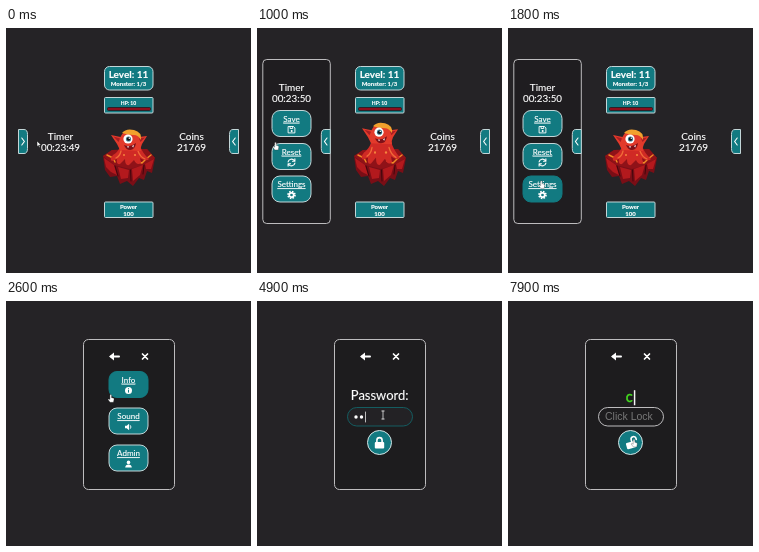
An HTML page for the animation above (8 s loop, 245 px wide and 245 px high).

```html
<!DOCTYPE html>
<html lang="en">
<head>
<meta charset="utf-8">
<title>Monster clicker</title>
<style>
html, body { margin: 0; height: 100%; overflow: hidden; background: #252326; }
svg { display: block; width: 100vw; height: 100vh; }
text { font-family: Lato, sans-serif; fill: #fff; stroke: #fff; stroke-width: .15px; text-anchor: middle; }
.hint { font-family: "Liberation Sans", Arial, sans-serif; fill: #777; stroke: none; text-anchor: start; }
</style>
</head>
<body>
<svg id="stage" viewBox="0 0 245 245"></svg>
<script>
const stage = document.getElementById('stage');
const LOOP = 8000, TEAL = '#127a81', EDGE = '#c3d6d8', FRAME = '#bdbcbe';

const text = (s, x, y, size, extra = '') =>
  `<text x="${x}" y="${y}" font-size="${size}" ${extra}>${s}</text>`;
const bold = (s, x, y, size) => text(s, x, y, size, 'font-weight="700"');
const box = (x, y, w, h, r, fill = TEAL, edge = EDGE) =>
  `<rect x="${x}" y="${y}" width="${w}" height="${h}" rx="${r}" fill="${fill}" stroke="${edge}"/>`;
const line = (d, w = 1, color = '#fff') =>
  `<path d="${d}" fill="none" stroke="${color}" stroke-width="${w}" stroke-linecap="round" stroke-linejoin="round"/>`;
const shape = (d, fill) => `<path d="${d}" fill="${fill}"/>`;
const disc = (x, y, r, fill) => `<circle cx="${x}" cy="${y}" r="${r}" fill="${fill}"/>`;
const at = (x, y, s, more = '') => `<g transform="translate(${x} ${y}) ${more}">${s}</g>`;

const ICONS = {
  save: line('M-3 -3H2L3.4 -1.6V3.4H-3Z M-1.4 -3V-1H1.2V-3', .9) + disc(.2, 1.4, 1, '#fff'),
  reset: line('M-3.4 -.6A3.5 3.5 0 0 1 2.8 -2 M3.4 -3.6V-1.2H1 M3.4 .6A3.5 3.5 0 0 1 -2.8 2 M-3.4 3.6V1.2H-1', 1.1),
  gear: `<circle r="3.4" fill="none" stroke="#fff" stroke-width="1.8" stroke-dasharray="1.5 1.17"/>
    <circle r="2.2" fill="none" stroke="#fff" stroke-width="1.7"/>`,
  info: disc(0, 0, 3.5, '#fff') + line('M0 -.3V1.7 M0 -1.9V-1.8', 1, TEAL),
  sound: shape('M-3.5 -1.2H-1.8L.6 -3.2V3.2L-1.8 1.2H-3.5Z', '#fff') + line('M2 -1.4Q3.2 0 2 1.4', .9),
  user: disc(0, -1.6, 1.8, '#fff') + shape('M-3.3 3.5Q-3 .6 0 .6T3.3 3.5Z', '#fff')
};

const CURSORS = {
  arrow: '<path d="M0 0V5.6L1.4 4.4L2.3 6.4L3.2 6L2.3 4.1H4.1Z" fill="#fff" stroke="#111" stroke-width=".5"/>',
  hand: `<path d="M-.8 .5a.8 .8 0 0 1 1.6 0V2.800l1.700 .4q1 .2 .8 1.300L2.700 7.400H-.7L-2.600 4.800q-.3 -.9 .8 -.7l1 .6Z"
    fill="#fff" stroke="#222" stroke-width=".3"/>`,
  beam: line('M-1.2 -4H1.2 M0 -4V4 M-1.2 4H1.2', .7)
};

// time, x, y of the pointer tip
const PATH = [
  [0, 31, 113], [500, 18.5, 114.5], [1050, 18.5, 114.5], [1500, 34, 122], [1800, 33.5, 153],
  [2100, 33.5, 153], [2500, 98, 84], [2800, 124, 122], [3000, 120, 154], [3200, 118.5, 152],
  [3900, 118.5, 152], [4200, 132, 126], [4500, 126, 114], [5100, 126, 114],
  [5500, 126, 138.5], [8000, 126, 138.5]
];

function pointer(t) {
  const i = PATH.findIndex(p => p[0] > t);
  const [t0, x0, y0] = PATH[i - 1], [t1, x1, y1] = PATH[i];
  const k = (t - t0) / (t1 - t0), e = k * k * (3 - 2 * k);
  return [x0 + (x1 - x0) * e, y0 + (y1 - y0) * e];
}

const inside = ([px, py], x, y, w, h) => px > x && px < x + w && py > y && py < y + h;

// a hovered button loses its light outline
function button(label, icon, x, y, p) {
  return box(x - 19.5, y, 39, 26, 8, TEAL, inside(p, x - 19.5, y, 39, 26) ? TEAL : EDGE) +
    text(label, x, y + 11.2, 8, 'text-decoration="underline"') + at(x, y + 19, ICONS[icon]);
}

// half-rounded side tab; dir -1 points left, 1 points right
function tab(x, dir) {
  return at(x, 113.5, `<path d="M-4.500 -12H1Q4.500 -12 4.500 -7V7Q4.500 12 1 12H-4.500Z" fill="${TEAL}" stroke="${EDGE}"/>` +
    line('M-1.200 -3.500L1.400 0L-1.200 3.500', 1.1), `scale(${dir} 1)`);
}

function monster(t) {
  const lift = 3.5 - 3.5 * Math.cos(t / 1800 * 2 * Math.PI);
  const island =
    shape('M97 128L106 122L141 121L149 130L146 145L141 143L138 152L133 150L127 158L121 153L114 156L111 148L104 149L99 142Z', '#7a0e16') +
    shape('M97 128L106 122L141 121L149 130L138 137L124 141L108 137Z', '#8f1218') +
    shape('M98 130L108 137L111 147L105 144L100 139Z M112 139L123 142L122 150L115 151Z M126 141L137 137L134 147L127 153Z M139 136L148 131L145 141L140 141Z', '#b3191d') +
    line('M109 138L112 148 M124.500 142L125 153 M138 137L137 146', 1, '#43070d') +
    line('M101 127L107 130L109 134 M145 127L140 131L136 135L130 133', 1.5, '#f08a25');
  const tentacles =
    shape('M114 119Q112 124 107 127Q103 131 106 133L111 131Q110 137 114 136L119 131Q119 138 123 137L128 132Q131 138 135 135L134 130Q140 134 143 131Q137 126 134 118Z', '#d02a25') +
    line('M115 123Q114 128 110 130 M132 123Q134 129 139 131', 1.3, '#f06a38') +
    disc(118, 127, 1, '#f6853d') + disc(129, 127, 1.1, '#f6853d');
  const head =
    shape('M114 122Q112 118 111 116L105 107L114.500 109Q117 103 122 103Q130 103 133 109L141 108L136 116Q134 120 135 123Z', '#e23a2b') +
    shape('M112.500 114L107.500 108.500L114 110.500Z M134.500 114L139 109.500L133 110.500Z', '#a91d22') +
    shape('M116 105Q120 100 128 102Q136 104 135 112Q132 107 128 107Q122 107 116 105Z', '#f2a12d') +
    disc(122, 111, 4.6, '#fff') + disc(122.5, 111, 2.6, '#3c7f94') + disc(122.5, 111, 1.7, '#151419') +
    disc(123.3, 110.2, .7, '#fff') +
    shape('M118 117Q124 120 130 115Q129 122 124 122Q120 122 118 117Z', '#7e1018') +
    shape('M121 118.200L122 120L123.200 118.500Z M126 118L127.200 119.500L128 117Z', '#fff');
  return island + at(0, 138, `<g transform="translate(0 -138)">${tentacles}</g>`, `scale(1 ${1 + lift / 30})`) + at(0, -lift, head);
}

function game(t, p) {
  const open = t >= 800, x = open ? 34.5 : 54.5, y = open ? 63 : 112;
  let s = box(98.5, 38.5, 48.5, 23.5, 5) + bold('Level: 11', 122.5, 50.3, 10) + bold('Monster: 1/3', 122.5, 58.3, 6) +
    box(98.5, 69.5, 48.5, 15.5, 1) + bold('HP: 10', 122.5, 77.2, 5) +
    '<rect x="101.500" y="79.500" width="43" height="3" rx="1" fill="#8d101c" stroke="#25191d" stroke-width=".8"/>' +
    monster(t) +
    box(98.5, 174, 48.5, 15.5, 1) + bold('Power', 122.5, 180.7, 6) + bold('100', 122.5, 187.7, 6) +
    text('Coins', 185.5, 112, 10) + text('21769', 185.5, 123, 10) + tab(228, -1);
  if (open) {
    s += box(5.8, 31.5, 67.5, 164, 4, '#1f1d20', FRAME) + button('Save', 'save', 34.5, 82.5, p) +
      button('Reset', 'reset', 34.5, 115.5, p) + button('Settings', 'gear', 34.5, 148, p);
  }
  return s + tab(open ? 68.8 : 17, open ? -1 : 1) +
    text('Timer', x, y, 10) + text(t < 900 ? '00:23:49' : '00:23:50', x, y + 11, 9.8);
}

function lock(t) {
  const open = t >= 6800, turn = open ? -15 * Math.min(1, (t - 6800) / 900) : 0;
  return '<circle cx="122.500" cy="141.500" r="12" fill="#127a81" stroke="#d5e4e5"/>' +
    at(122.5, 142, '<rect x="-4.700" y="-1" width="9.400" height="6.500" rx="1" fill="#fff"/>' +
      line(open ? 'M1.500 -1V-3a2.500 2.500 0 0 1 5 0V-2' : 'M-2.600 -1V-2.800a2.600 2.600 0 0 1 5.200 0V-1', 1.6),
      `rotate(${turn})`);
}

function title(t) {
  if (t < 6800) return text('Password:', 122.7, 99, 13);
  const kept = 'Password:'.slice(0, Math.max(0, 8 - Math.floor((t - 6800) / 100)));
  const typed = t >= 7900 ? '<tspan fill="#45dc20" stroke="#45dc20" stroke-width=".5">c</tspan>' : kept;
  return text(typed + '<tspan stroke-width=".4">|</tspan>', 123, 101, 14.5);
}

function form(t) {
  const focus = t >= 4700 && t < 6800;
  let s = title(t) + box(90.5, 106.5, 65, 18.5, 9.25, focus ? '#232225' : '#1d1c1e', focus ? '#145d61' : FRAME);
  if (focus && t < 6200) {
    const n = Math.min(6, Math.floor((t - 4700) / 100));
    for (let i = 0; i < n; i++) s += disc(99 + i * 5.5, 116, 1.7, '#fff');
    if (t < 5700) s += line(`M${97.5 + n * 5.5} 111V121`, .7);
  }
  if (t >= 6800) s += text('Click Lock', 97, 119.3, 10.5, 'class="hint"');
  return s + lock(t);
}

function modal(t, p) {
  const content = t < 3500
    ? button('Info', 'info', 122.5, 70.5, p) + button('Sound', 'sound', 122.5, 107, p) + button('Admin', 'user', 122.5, 144, p)
    : form(t);
  return box(77.5, 38.5, 91, 150, 5, '#1d1c1e', FRAME) +
    line('M113 55.500H105', 2) + shape('M103 55.500L108 51.500V59.500Z', '#fff') +
    line('M136.500 53L141.500 58M141.500 53L136.500 58', 1.7) + content;
}

function cursorKind(t, p) {
  if (t < 300) return 'arrow';
  if (t < 2100 || t >= 5400) return 'hand';
  if (t < 3500) return inside(p, 103, 70, 39, 100) ? 'hand' : 'arrow';
  if (t < 4100) return 'hand';
  return inside(p, 90, 106, 66, 19) ? 'beam' : 'arrow';
}

function draw(now) {
  const t = Math.floor(now % LOOP / 100) * 100, p = pointer(t);
  stage.innerHTML = (t < 2000 ? game(t, p) : modal(t, p)) + at(p[0], p[1], CURSORS[cursorKind(t, p)]);
}

const start = performance.now();
function tick() {
  draw(performance.now() - start);
  requestAnimationFrame(tick);
}
tick();
</script>
</body>
</html>
```
